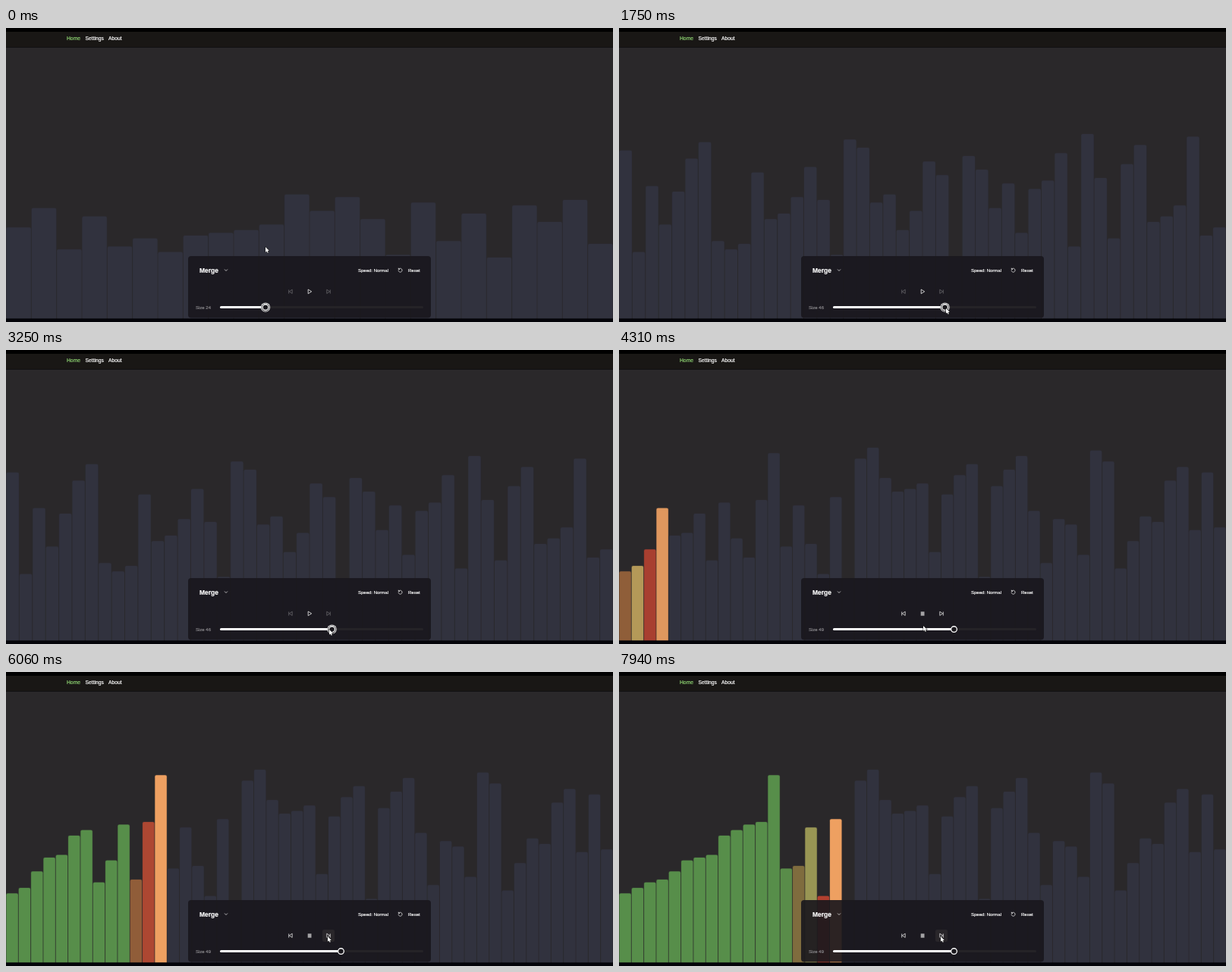
An HTML page with a canvas for the animation above (8 s loop, 800 px wide and 388 px high).

```html
<!DOCTYPE html>
<html lang="en">
<head>
<meta charset="utf-8">
<title>Sorting visualizer</title>
<style>
  html, body { margin: 0; width: 100%; height: 100%; overflow: hidden; background: #000; }
  canvas { display: block; width: 800px; height: 388px; }
</style>
</head>
<body>
<canvas id="stage" width="800" height="388"></canvas>
<script>
const ctx = document.getElementById('stage').getContext('2d');
const LOOP = 8000, FLOOR = 383.5, LOWEST = 303, LEVEL = 3.625;
const PLAY_AT = 4050, SORT_AT = 4165, STEP = 103, ATTACK = 60, FADE = 200;
const BACK = [42, 40, 42], IDLE = [49, 50, 62];
const LEFT = [178, 64, 47], RIGHT = [238, 160, 97], DONE = [87, 142, 74];

const mix = (a, b, p) => a + (b - a) * p;
const mixColor = (a, b, p) => a.map((v, n) => mix(v, b[n], p));
const css = color => `rgb(${color.map(Math.round)})`;

// The levels 0 to count - 1 in random order, after an optional fixed opening
function shuffled(count, seed, opening = []) {
  const rest = [...Array(count).keys()].filter(level => !opening.includes(level));
  for (let n = rest.length - 1; n > 0; n--) {
    seed = (seed * 1664525 + 1013904223) % 4294967296;
    const pick = Math.floor(seed / 4294967296 * (n + 1));
    [rest[n], rest[pick]] = [rest[pick], rest[n]];
  }
  return [...opening, ...rest];
}
const small = shuffled(24, 7);
const large = shuffled(46, 21);
const full = shuffled(49, 5, [3, 5, 11, 26, 16, 17, 24, 7, 28, 15, 8, 29, 46, 12, 27, 13, 2, 30, 0]);

const layouts = [[0, small], [1200, small], [1700, large], [3290, large], [3430, full], [LOOP, full]];
const sizes = [[0, 24], [1050, 24], [1700, 46], [2350, 46], [2650, 40], [2900, 40], [3420, 49], [LOOP, 49]];
const pointer = [[0, 342, 289], [750, 342, 368], [1050, 345, 369], [1700, 431, 370], [2250, 431, 370],
  [2600, 391, 369], [2900, 395, 369], [3420, 441, 369], [3950, 400, 348], [4310, 401, 364],
  [5250, 416, 354], [5500, 424, 349], [LOOP, 424, 349]];

function segment(keys, t) {
  const n = keys.findIndex(key => key[0] > t);
  const a = keys[n - 1], b = keys[n];
  return [a, b, (t - a[0]) / (b[0] - a[0])];
}
function track(keys, t) {
  const [a, b, p] = segment(keys, t);
  return a.slice(1).map((v, n) => mix(v, b[n + 1], p));
}

// One step per comparison, holding the list just after its write
function mergeSteps(source) {
  const list = source.slice(), steps = [];
  (function sort(lo, hi) {
    if (lo >= hi) return;
    const mid = (lo + hi) >> 1;
    sort(lo, mid);
    sort(mid + 1, hi);
    const copy = list.slice();
    let i = lo, j = mid + 1, k = lo;
    while (i <= mid && j <= hi) {
      const step = { i, j };
      list[k++] = copy[i] <= copy[j] ? copy[i++] : copy[j++];
      step.list = list.slice();
      steps.push(step);
    }
    while (i <= mid) list[k++] = copy[i++];
    while (j <= hi) list[k++] = copy[j++];
  })(0, list.length - 1);
  return steps;
}
const steps = mergeSteps(full);

function barColor(bar, elapsed) {
  let from = IDLE, to = IDLE, start = 0;
  const at = time => {
    const p = Math.min(1, (time - start) / (to === DONE ? FADE : ATTACK));
    return mixColor(from, to, 1 - (1 - p) ** 2);
  };
  for (let s = 0; s * STEP <= elapsed; s++) {
    const { i, j } = steps[s];
    const next = bar === i ? LEFT : bar === j ? RIGHT : to === IDLE ? IDLE : DONE;
    if (next === to) continue;
    from = at(s * STEP);
    to = next;
    start = s * STEP;
  }
  return at(elapsed);
}

function rect(x, y, w, h, color, radius = 0) {
  ctx.fillStyle = color;
  ctx.beginPath();
  ctx.roundRect(x, y, w, h, radius);
  ctx.fill();
}
function text(label, x, y, size, color, weight = 400) {
  ctx.font = `${weight} ${size}px "Liberation Sans", Arial, sans-serif`;
  ctx.fillStyle = ctx.strokeStyle = color;
  ctx.lineWidth = 0.2;
  ctx.fillText(label, x, y);
  ctx.strokeText(label, x, y);
}
function shape(d, x, y, line, width = 0.8, fill = 'transparent') {
  const path = new Path2D(d);
  ctx.save();
  ctx.translate(x, y);
  ctx.strokeStyle = line;
  ctx.fillStyle = fill;
  ctx.lineWidth = width;
  ctx.lineJoin = ctx.lineCap = 'round';
  ctx.stroke(path);
  ctx.fill(path);
  ctx.restore();
}
function disc(x, y, r, color) {
  rect(x - r, y - r, 2 * r, 2 * r, color, r);
}

function drawBars(t, count) {
  const elapsed = t - SORT_AT, sorting = elapsed >= 0, width = 800 / count;
  const [[, before], [, after], p] = segment(layouts, t);
  const sorted = sorting && steps[Math.floor(elapsed / STEP)].list;
  for (let n = 0; n < count; n++) {
    const level = sorting ? sorted[n] : mix(before[n % before.length], after[n % after.length], p);
    const color = sorting ? barColor(n, elapsed) : IDLE;
    const x = n * width, top = LOWEST - level * LEVEL;
    rect(x, top - 0.5, width, FLOOR - top + 0.5, css(mixColor(color, BACK, 0.7)), [2, 2, 0, 0]);
    rect(x + 0.5, top, width - 1, FLOOR - top, css(color), [2, 2, 0, 0]);
  }
}

function drawPanel(t, count) {
  const playing = t >= PLAY_AT;
  rect(240, 301, 320, 81.5, 'rgba(26,24,29,.91)', 4);
  text('Merge', 255, 322.5, 8.5, '#fff', 700);
  shape('M-1.7-.8 0 .9 1.7-.8', 290, 319.6, '#ddd');
  text('Speed: Normal', 464, 321.8, 6, '#f4f4f4');
  shape('M-2-1.6A2.5 2.5 0 1 1-2.5.5M-2.3-2.6V-1.2H-.9', 519.6, 319.7, '#e8e8e8');
  text('Reset', 530, 321.8, 6, '#f4f4f4');

  if (t >= 5400) rect(417, 340, 16, 16, '#29262a', 2);
  const skip = playing ? '#e4e4e4' : '#69676b';
  shape('M2.2-2.4V2.4L-1.4 0ZM-2.3-2.2V2.2', 375, 348, skip);
  shape('M-2.2-2.4V2.4L1.4 0ZM2.3-2.2V2.2', 425, 348, skip);
  if (playing) rect(397.7, 345.3, 4.8, 5.4, '#a4a3a5');
  else shape('M-1.8-2.6V2.6L2.4 0Z', 400, 348, '#f0f0f0');

  const x = 342 + (count - 24) * 3.98, y = 368.6;
  text('Size ' + count, 250, 371, 6, '#858387');
  rect(282, 367.1, 268, 3, '#252327', 1.5);
  rect(282, 367.1, x - 282, 3, '#fff', 1.5);
  if (!playing) {
    disc(x, y, 6.2, '#e8e8e8');
    disc(x, y, 5.2, '#1b191e');
  }
  disc(x, y, 4.5, '#fff');
  disc(x, y, 3.2, '#1b191e');
}

function draw(t) {
  const count = Math.round(track(sizes, t)[0]);
  rect(0, 0, 800, 388, '#000');
  rect(0, 5, 800, 20, '#191715');
  rect(0, 25, 800, 1, '#111012');
  rect(0, 26, 800, FLOOR - 26, css(BACK));
  text('Home', 80, 16.4, 6.75, '#8fd673');
  text('Settings', 104.5, 16.4, 6.75, '#fff');
  text('About', 135, 16.4, 6.75, '#fff');
  drawBars(t, count);
  rect(0, FLOOR, 800, 388 - FLOOR, '#040409');
  drawPanel(t, count);
  const [x, y] = track(pointer, t);
  shape('M0 0V6.8L1.6 5.4 2.6 7.7 3.8 7.2 2.8 5H4.9Z', x, y, '#111', 1, '#fff');
}

const began = performance.now();
function frame() {
  draw((performance.now() - began) % LOOP);
  requestAnimationFrame(frame);
}
frame();
</script>
</body>
</html>
```
